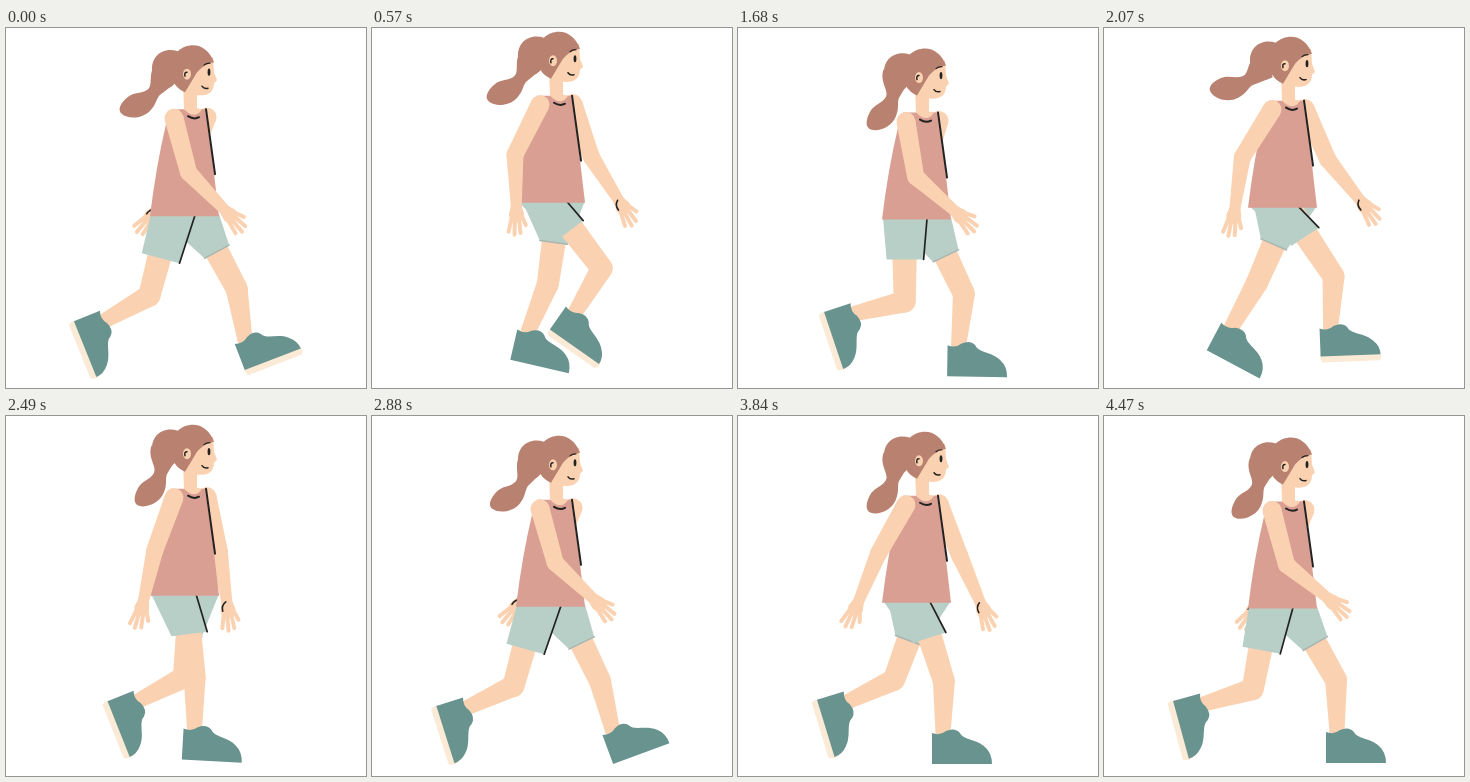
These frames come from a looping animation (360x360 px, 4.5 s). An HTML page with a canvas:

```html
<!DOCTYPE html>
<html>
<head>
<meta charset="utf-8">
<style>
html, body { margin: 0; width: 100%; height: 100%; overflow: hidden; background: #fff; }
canvas { display: block; }
</style>
</head>
<body>
<canvas id="stage" width="360" height="360"></canvas>
<script>
const ctx = document.getElementById('stage').getContext('2d');
const SKIN = '#fbd2b1', HAIR = '#b98270', SHIRT = '#d99f92', SHORTS = '#b8cfc8',
  HEM = '#a9b5b0', SHOE = '#69938f', SOLE = '#fbead6', INK = '#222';
const LOOP = 4500, STEP = 30, STRIDE = 46, TAU = 2 * Math.PI;
const THIGH = 80, SHIN = 52, UPPER_ARM = 56, FOREARM = 51;

// Path of an ankle over one stride, from landing: phase, x, y, foot angle.
const footPath = [
  [0, 239, 312, -21], [4, 233, 316, 0], [10, 205, 317, 0], [18, 156, 304, 13], [20, 127, 300, 28],
  [25, 98, 293, 68], [27, 94, 291, 74], [31, 109, 286, 73], [41, 190, 285, 51], [44, 211, 288, 22]];

// Smooth periodic interpolation through the keys.
function sample(keys, p) {
  const n = keys.length;
  const key = i => {
    const [t, ...v] = keys[(i + n) % n];
    return { t: t + STRIDE * Math.floor(i / n), v };
  };
  const i = keys.findLastIndex(k => k[0] <= p);
  const [a, b, c, d] = [key(i - 1), key(i), key(i + 1), key(i + 2)];
  const span = c.t - b.t, u = (p - b.t) / span, w = u * u * (3 - 2 * u);
  return b.v.map((v, j) => {
    const m0 = (c.v[j] - a.v[j]) / (c.t - a.t), m1 = (d.v[j] - v) / (d.t - b.t);
    return v + (c.v[j] - v) * w + span * u * (1 - u) * ((1 - u) * m0 - u * m1);
  });
}

const swing = (p, mean, reach, peak) => mean + reach * Math.cos(TAU * (p - peak) / STRIDE);

// The body rises slowly over each planted foot, then drops quickly.
function bobAt(p) {
  const half = STRIDE / 2, q = ((p - 2 + STRIDE) % half) / half;
  return -8.3 + 10.3 * Math.cos(TAU * q ** 1.5) + 2.5 * Math.sin(TAU * (p - 2) / STRIDE);
}

// The ponytail hangs at an angle and flies up with each drop.
function tailAt(p) {
  return 62 - swing(p, 36, -6, 0) * Math.cos(TAU * (p - 21) / STRIDE) ** 8;
}

function fill(path, color) {
  ctx.fillStyle = color;
  ctx.fill(new Path2D(path));
}

function line(path, color, width) {
  ctx.strokeStyle = color;
  ctx.lineWidth = width;
  ctx.stroke(new Path2D(path));
}

function poly(points, color) {
  fill('M' + points.map(q => q.join()).join('L') + 'Z', color);
}

function at(x, y, degrees, draw) {
  ctx.save();
  ctx.translate(x, y);
  ctx.rotate(degrees * Math.PI / 180);
  draw();
  ctx.restore();
}

// Tapered bones with round joints; each joint is [x, y, radius].
function limb(joints) {
  ctx.fillStyle = SKIN;
  joints.forEach(([x, y, r], i) => {
    ctx.beginPath();
    ctx.arc(x, y, r, 0, TAU);
    ctx.fill();
    if (!i) return;
    const [x0, y0, r0] = joints[i - 1];
    const len = Math.hypot(x - x0, y - y0), nx = (y0 - y) / len, ny = (x - x0) / len;
    poly([[x0 + nx * r0, y0 + ny * r0], [x + nx * r, y + ny * r],
      [x - nx * r, y - ny * r], [x0 - nx * r0, y0 - ny * r0]], SKIN);
  });
}

// Angles are measured forward from hanging straight down.
function arm(x, y, upper, fore, marked) {
  at(x, y, -upper, () => {
    limb([[0, 0, 9.5], [0, UPPER_ARM, 8.5]]);
    at(0, UPPER_ARM, upper - fore, () => {
      limb([[0, 0, 8.5], [0, FOREARM, 5.5], [0, FOREARM + 9, 7.5]]);
      at(0, FOREARM, 93, () => {
        line('M8-5L19-10M12-3L27-5M12 1L29 1M11 4L26 7', SKIN, 4);
        if (marked) line('M0 1Q3 6 9 5', INK, 1.6);
      });
    });
  });
}

function shoe(planted) {
  const base = planted ? 31 : 28;
  if (!planted) fill('M-11 24L49 24Q51 31 48 34L-9 34Q-12 33-11 24Z', SOLE);
  fill(`M-11 0Q-3 3 3-2Q12-6 17 0C20 7 34 6 42 14Q49 20 49 ${base}L-11 ${base}Z`, SHOE);
}

function leg(u, bob, far) {
  const [ax, ay, angle] = sample(footPath, u);
  const hx = far ? 188 + (ax - 170) * .07 : 174 + (ax - 160) * .17, hy = 192 + bob;

  // Place the knee in front of the line from hip to ankle.
  const reach = Math.hypot(ax - hx, ay - hy), ux = (ax - hx) / reach, uy = (ay - hy) / reach;
  const along = Math.min(THIGH, (THIGH ** 2 - SHIN ** 2 + reach ** 2) / (2 * reach));
  const bend = Math.sqrt(THIGH ** 2 - along ** 2);
  const kx = hx + ux * along + uy * bend, ky = hy + uy * along - ux * bend;
  limb([[hx, hy, 13], [kx, ky, 11], [ax, ay, 7.5]]);
  at(ax, ay, angle, () => shoe(u >= 1 && u < 21));

  const dx = (kx - hx) / THIGH, dy = (ky - hy) / THIGH, top = 188 + bob;
  const length = 38 - 12 * dx * !far;
  const hem = w => [hx + dx * length + dy * w, hy + dy * length - dx * w];
  const front = hem(far ? 14 : 19 - 8 * dx), back = hem(far ? -14 : -18);
  const edge = 189 + 10 * Math.max(dx, 0);
  poly([[far ? 150 : 145, top], [far ? 213 : edge, top], front, back], SHORTS);
  if (far) line(`M${front}L${back}`, HEM, 1.5);
  else line(`M${edge} ${top + 1}L${front}`, INK, 1.7);
}

function torso() {
  fill('M165 83L199 83Q202 105 206 130L213 190L144 190Q150 140 160 98Z', SHIRT);
  line('M200 83L209 148', INK, 2);
  fill('M177 56L191 62L191 82L196 83Q189 94 178 83Z', SKIN);
  line('M182 90Q188 94 193 91', INK, 2);
}

function head(tail) {
  at(156, 50, -tail, () =>
    fill('M4-14C-9-12-12 1-19 1C-27 1-31-6-40-6C-49-6-56-3-55 3C-54 11-43 20-32 19C-22 18-20 14-14 13L8 14Z', HAIR));
  fill('M172 25C156 20 145 31 146 44C147 55 152 63 161 62C168 61 171 55 172 46Z', HAIR);
  fill('M178 34L207 31L208 46L211 54L208 57C208 67 200 70 192 69L178 64Z', SKIN);
  fill('M165 43C165 27 176 19 187 19C196 19 204 25 208 36Q199 37 191 46Q185 56 179 66Q165 60 165 43Z', HAIR);
  fill('M177 48A4 5.5 0 0 1 185 48A4 5.5 0 0 1 177 48Z', SKIN);
  line('M179 50Q178 46 181 46', INK, 1.5);
  line('M198 39Q200 37 204 37', INK, 1.2);
  line('M196 60Q198 63 202 62', INK, 1.5);
  fill('M201.6 46A1.4 3.6 0 0 1 204.4 46A1.4 3.6 0 0 1 201.6 46Z', INK);
}

// The walk advances in steps and rests briefly at the start of each stride.
function phaseAt(t) {
  if (t < STEP) return 0;
  return Math.max(1, Math.floor(t % 1440 / STEP) - 1) % STRIDE;
}

function frame() {
  const p = phaseAt(performance.now() % LOOP), bob = bobAt(p);
  ctx.fillStyle = '#fff';
  ctx.fillRect(0, 0, 360, 360);
  ctx.lineCap = 'round';
  arm(201, 91 + bob, swing(p, 4, -26, 2), swing(p, 3, -40, .5), true);
  leg(p, bob, true);
  leg((p + 25) % STRIDE, bob, false);
  at(0, bob, 0, () => {
    torso();
    head(tailAt(p));
  });
  arm(168, 92 + bob, swing(p, -11, 27, 2), swing(p, 12, 39, 4.5), false);
  requestAnimationFrame(frame);
}
frame();
</script>
</body>
</html>
```
